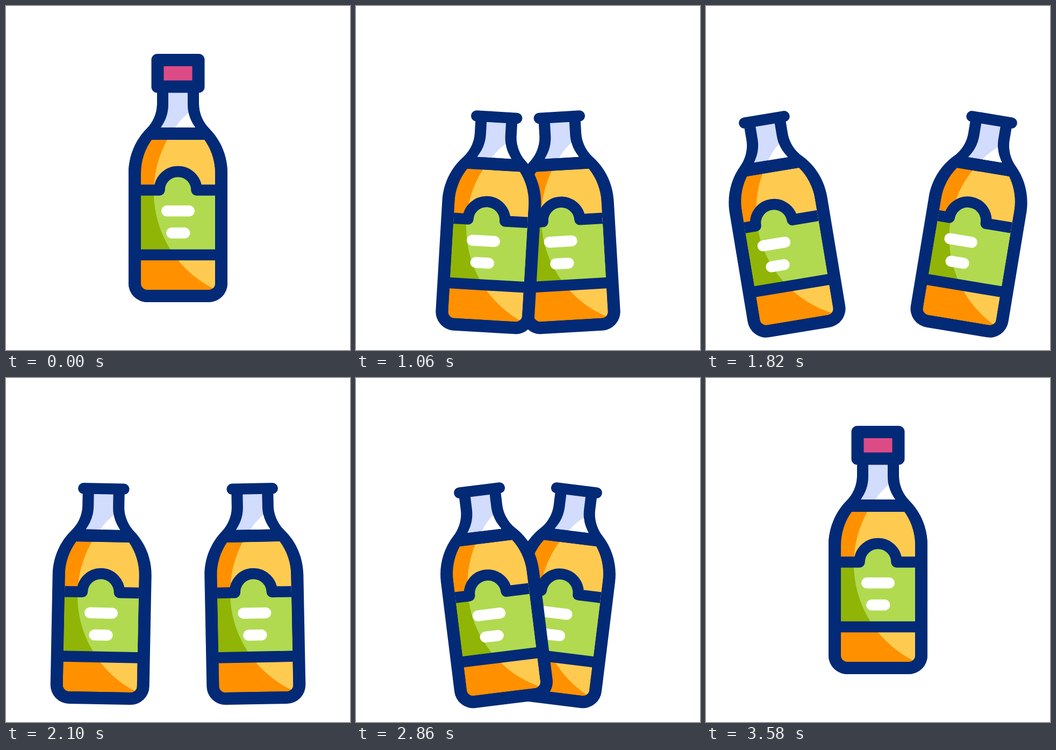
Recreate the animation shown at these times as an HTML page. Size 640 by 640 pixels, loop 3.6 s.

```html
<!DOCTYPE html>
<html lang="en">
<head>
<meta charset="utf-8">
<title>Bottles clinking</title>
<style>
  html, body { margin: 0; height: 100%; overflow: hidden; background: #fff; }
  svg { display: block; width: 100%; height: 100%; }
  .line { fill: none; stroke: #032a76; stroke-width: 20.5; stroke-linejoin: round; stroke-linecap: round; }
  .drop { fill: none; stroke: #fecb50; stroke-width: 20.5; stroke-linecap: round; }
</style>
</head>
<body>
<svg viewBox="0 0 640 640">
  <defs>
    <clipPath id="inside"><path d="M271 249H369C382 267 389 289 389 312V516a12 12 0 0 1-12 12H263a12 12 0 0 1-12-12V312C251 289 258 267 271 249Z"/></clipPath>
    <clipPath id="label"><path class="bump" d="M200 342.500H285.500A34.500 34.500 0 0 1 354.500 342.500H440V463H200Z"/></clipPath>
    <clipPath id="neck"><path d="M302 155V183C302 200 297 213 288 226H352C343 213 338 200 338 183V155Z"/></clipPath>
    <circle id="shine" cx="476" cy="346" r="201"/>
    <g id="bottle">
      <path fill="#032a76" d="M281 150V183C281 200 273 217 262 228C240 250 228 280 228 311V516a35 35 0 0 0 35 35H377a35 35 0 0 0 35-35V311C412 280 400 250 378 228C367 217 359 200 359 183V150Z"/>
      <g clip-path="url(#neck)">
        <path fill="#d2dcfd" d="M280 150H360V230H280Z"/>
        <path fill="#fff" d="M315 226Q326 209 342 197L360 230H313Z"/>
      </g>
      <g clip-path="url(#inside)">
        <path fill="#ff9100" d="M250 240H390V530H250Z"/>
        <use href="#shine" fill="#fecb50"/>
        <g clip-path="url(#label)">
          <path fill="#90b506" d="M250 300H390V470H250Z"/>
          <use href="#shine" fill="#b1da51"/>
        </g>
        <path class="line bump" d="M200 342.500H285.500A34.500 34.500 0 0 1 354.500 342.500H440"/>
        <g id="bars" fill="#fff">
          <rect x="289" y="371" width="62" height="20.500" rx="10.250"/>
          <rect x="298" y="412" width="44.500" height="20.500" rx="10.250"/>
        </g>
      </g>
      <path class="line" d="M282.500 150H357.500M245 463H395"/>
    </g>
  </defs>
  <path class="drop" id="drops"/>
  <use href="#bottle" id="right"/>
  <use href="#bottle" id="left"/>
  <g id="cap">
    <rect x="270.500" y="89" width="99" height="72.500" rx="11" fill="#032a76"/>
    <rect x="293.500" y="112" width="53" height="26.500" fill="#dd4b86"/>
  </g>
</svg>
<script>
const LOOP = 3600;
const [drops, left, right, cap, bars] =
  ['drops', 'left', 'right', 'cap', 'bars'].map(id => document.getElementById(id));
const bumps = document.querySelectorAll('.bump');

// Eased value at time t from [time, value] keys
function track(t, keys) {
  const i = keys.findIndex(([time]) => time > t);
  if (i < 0) return keys[keys.length - 1][1];
  if (i === 0) return keys[0][1];
  const [t0, a] = keys[i - 1], [t1, b] = keys[i];
  const u = (t - t0) / (t1 - t0);
  return a + (b - a) * u * u * (3 - 2 * u);
}

// The label turns with the bottle: zero, one side, other side, back
const turn = (a, b) => [[733, 0], [1340, a], [1933, a], [2267, b], [2567, b], [3000, a], [3400, 0]];

const DROP = [[0, 0], [380, 56], [2992, 56], [3337, 0]];
const SPREAD = [[733, 0], [1340, 146], [2567, 146], [3020, 0]];
const TILT = [[733, 0], [1340, 6], [1463, 6], [1933, -12], [2267, 14], [2567, -4], [3000, -8], [3400, 0]];
const BARS = turn(-20, 19);
const BUMP = turn(-13.5, 10);
const CAP_FALL = [[3233, 240], [3567, 0]];
const SPLASH_HEAD = [[2267, 18], [2433, 50.3]];
const SPLASH_TAIL = [[2367, 18], [2600, 50.3]];

function splash(t) {
  const head = track(t, SPLASH_HEAD), tail = track(t, SPLASH_TAIL);
  if (head - tail < 0.1) return '';
  let d = '';
  for (const sx of [-1, 1])
    for (const sy of [-1, 1])
      d += `M${320 + sx * tail} ${205.8 + sy * tail * 0.955}L${320 + sx * head} ${205.8 + sy * head * 0.955}`;
  return d;
}

function draw(t) {
  const y = track(t, DROP), x = track(t, SPREAD), tilt = track(t, TILT);
  const lift = t < 2000 ? Math.min(240, 60 * (Math.max(0, t - 360) / 160) ** 2) : track(t, CAP_FALL);
  const move = (el, dx, dy = 0, angle = 0) =>
    el.setAttribute('transform', `translate(${dx} ${dy}) rotate(${angle} 320 551)`);
  move(left, -x, y, tilt);
  move(right, x, y, -tilt);
  move(cap, lift * 19 / 60, y - lift);
  move(bars, track(t, BARS));
  bumps.forEach(el => move(el, track(t, BUMP)));
  drops.setAttribute('d', splash(t));
}

const start = performance.now();
function tick() {
  draw((performance.now() - start) % LOOP);
  requestAnimationFrame(tick);
}
draw(0);
requestAnimationFrame(tick);
</script>
</body>
</html>
```
